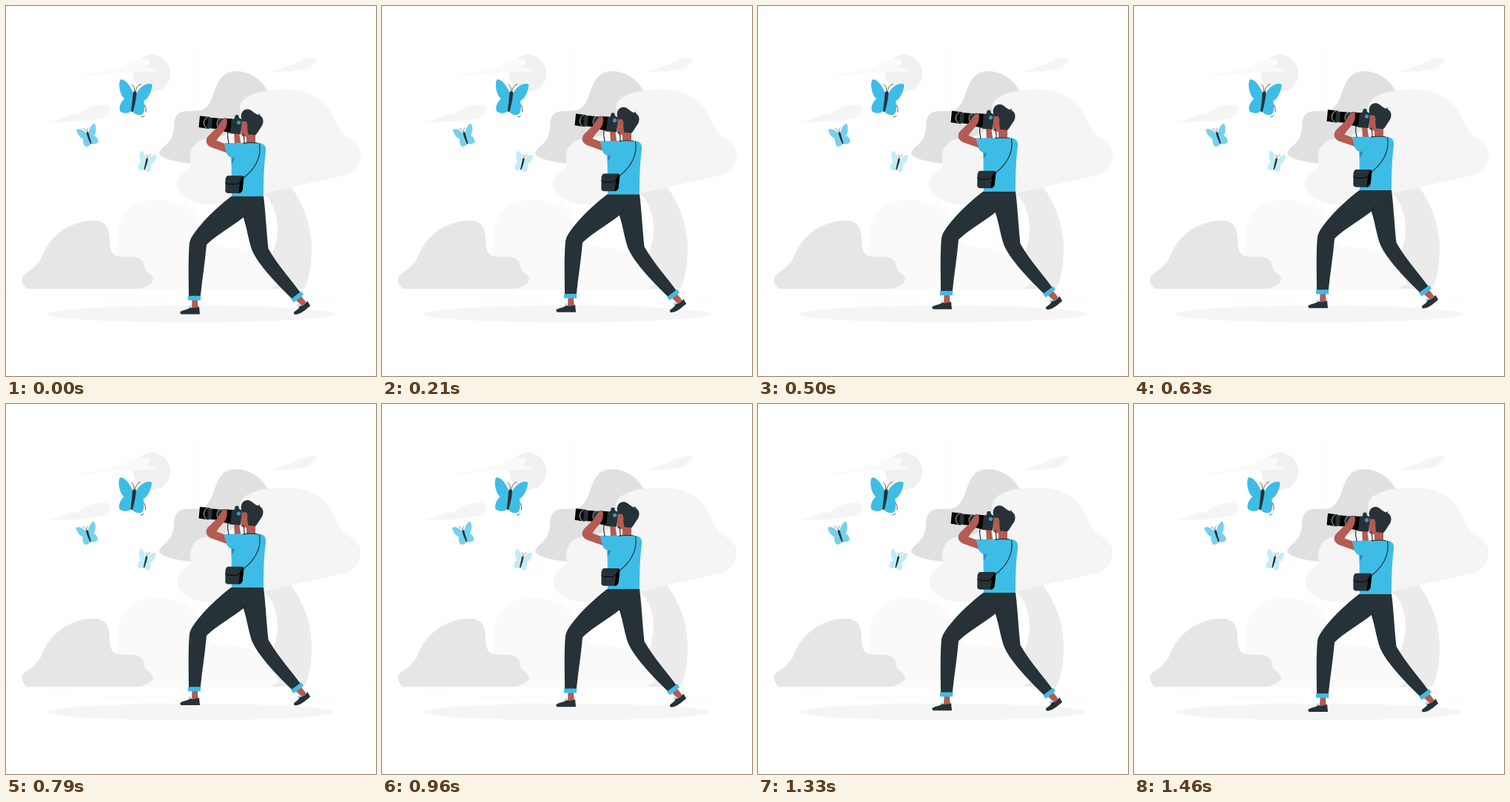
Animation, 500 px wide and 500 px high, one loop 1500 ms. Source, as an HTML page with a canvas:

```html
<!DOCTYPE html>
<html lang="en">
<head>
<meta charset="utf-8">
<title>Butterfly photographer</title>
<style>
html, body { margin: 0; width: 100%; height: 100%; overflow: hidden; background: #fff; }
canvas { display: block; width: 500px; height: 500px; }
</style>
</head>
<body>
<canvas id="stage"></canvas>
<script>
const canvas = document.getElementById('stage');
const ctx = canvas.getContext('2d');
const ratio = window.devicePixelRatio || 1;
canvas.width = canvas.height = 500 * ratio;

const LOOP = 1500, FPS = 24;
const BLUE = '#3dbde5', DARK = '#263238', SKIN = '#b55b52', BLACK = '#000';

const fill = (color, d) => { ctx.fillStyle = color; ctx.fill(new Path2D(d)); };
const line = (color, width, d) => {
  ctx.strokeStyle = color;
  ctx.lineWidth = width;
  ctx.stroke(new Path2D(d));
};
const oval = (color, x, y, rx, ry = rx) => {
  ctx.fillStyle = color;
  ctx.beginPath();
  ctx.ellipse(x, y, rx, ry, 0, 0, Math.PI * 2);
  ctx.fill();
};

// CSS "ease-out": cubic-bezier(0, 0, .58, 1)
function easeOut(p) {
  const bezier = (b, s) => 3 * b * s * s * (1 - s) + s ** 3;
  let low = 0, high = 1;
  for (let i = 0; i < 20; i++) {
    const mid = (low + high) / 2;
    if (bezier(.58, mid) < p) low = mid; else high = mid;
  }
  return bezier(1, low);
}

const SHAKE = [0, -1, 2, -4, 4, -4, 4, -4, 2, -1, 0];
function shake(p) {
  const i = Math.min(9, Math.floor(p * 10));
  return SHAKE[i] + (SHAKE[i + 1] - SHAKE[i]) * easeOut(p * 10 - i);
}
const float = p => -10 * (1 - Math.abs(2 * p - 1));

function drawBackground() {
  ctx.fillStyle = '#ebebeb';
  ctx.fillRect(0, 382.4, 500, .25);
  for (const [x, y, w] of [[416.8, 398.5, 33.1], [322.5, 401.2, 8.7], [396.6, 389.2, 19.2],
                           [52.5, 390.9, 43.2], [104.6, 390.9, 6.3], [131.5, 395.1, 93.7]])
    ctx.fillRect(x, y, w, .25);
  for (const x of [38.3, 254.6]) {
    ctx.strokeStyle = '#ebebeb';
    ctx.lineWidth = .25;
    ctx.beginPath();
    ctx.roundRect(x, 55.1, 204.3, 282.6, 5.6);
    ctx.stroke();
  }

  oval('#f0f0f0', 197, 91, 25);
  fill('#fafafa', 'M95 94C115 91 130 92 146 85C150 81 158 85 164 77C172 72 183 71 192 72C197 75 195 80 187 83C195 85 205 84 205 88C190 90 160 88 135 92C120 94 105 95 95 94Z');
  fill('#f5f5f5', 'M56 157C66 156 75 151 88 147C92 145 98 148 101 143C108 138 120 133 133 133C143 134 143 142 138 146C130 150 132 151 136 151C120 152 108 156 97 156C85 156 68 158 56 157Z');
  fill('#f5f5f5', 'M356 89C366 86 372 84 379 81C383 79 387 81 391 77C396 74 406 70 418 70C423 73 417 79 409 82C411 84 416 83 417 84C405 84 396 87 388 88C376 88 366 89 356 89Z');

  // trees and bushes
  fill('#ebebeb', 'M347 250L385 245C402 266 413 298 413 330C413 355 408 375 402 382H357C340 370 350 350 361 332C372 305 368 268 347 253Z');
  fill('#e0e0e0', 'M207 200C208 191 218 189 223 179C230 167 224 155 232 146C240 139 256 144 266 140C276 135 279 122 283 112C288 97 296 88 310 88C330 88 346 100 354 116L380 200L300 213H250C232 211 214 208 207 200Z');
  fill('#f5f5f5', 'M249.5 213C247 196 253 183 268 180C308 178 320 160 316 137C318 120 345 113 378 113C412 113 432 128 440 145C447 160 453 175 466 180C476 186 481 195 479 206C476 220 466 226 455 229L350 253C340 262 310 267 280 268C250 268 232 255 231 240C232 226 249 222 249.5 213Z');
  fill('#fafafa', 'M151 340C149 320 150 304 155 291C162 270 182 262 205 262C240 262 255 275 262 300C268 318 278 326 300 326C335 325 350 345 370 375L357 382H150Z');
  fill('#e6e6e6', 'M28 382C20 375 20 366 26 362C38 354 43 350 49 338C61 307 88 292 115 290C130 289 140 295 140 315C140 332 144 337 155 339C175 337 186 340 187 352C188 362 199 362 199 370C196 378 185 382 178 382Z');

  oval('#f5f5f5', 249.5, 416.2, 193.9, 11.3);
}

function drawLegs() {
  // ankles and shoes
  fill(SKIN, 'M251.5 396H259L259.5 408H251Z');
  fill(SKIN, 'M392 398L399 392L406 401L400 405Z');
  fill('#a8e0f3', 'M246 407L249 404L251 408Z');
  fill('#a8e0f3', 'M393 405L397 402L400 406L397 409Z');
  fill(DARK, 'M235.5 413C240 410.5 245 410.5 249 407.5C253 408.5 257 408 261 406.5L262 416.5H236.5Q235 415 235.5 413Z');
  fill(DARK, 'M389.3 413.5C393 411 396 408.5 397 405.5C402 405 405 402 407.5 398.8L411.2 405.3C404 411 399 416 392 416.9Q388 417 389.3 413.5Z');
  // trousers
  fill(DARK, 'M305 257C292 266 265.5 290 253 309Q248 316 247.7 323C246 345 247 370 247 393H262.7C265 370 269 346 271 322.5C285 309 305 298 321 285.5C325 298 328 318 332.5 330C339 346 360 370 388 397L398 387.5C387 372 367 350 354.5 328C352 305 350.5 275 348 257Z');
  line('#141b1f', .8, 'M331 275C326 280 322 281 321.5 286L325 297');
  fill(BLUE, 'M246 391.7H263V397.7H246Z');
  fill(BLUE, 'M385 396L399 385.5L402 390L389 400.5Z');
}

function drawHead() {
  fill(SKIN, 'M316 153H327L337 168V187H325V177L318 175Z');
  fill(DARK, 'M318 152C316 143 323 138 329 140C334 142 336 146 341 147L342.5 145L343 148C349 151 348 158 346 162C342 167 340 172 337 174.5L327 173.5L326 163L325 156L319 156Z');
  oval(SKIN, 322.8, 161.5, 3.6, 5);
  line('#8c413b', .6, 'M321 161.5Q323 158.5 324.5 160.5');
}

function drawCamera() {
  fill(SKIN, 'M308 170H315L317.5 188H309Z');
  fill(BLACK, 'M262 148.4L275.5 150L274 166L260.5 164Z');
  fill(DARK, 'M273 150.5L304 153V168L272 165Z');
  fill(BLACK, 'M279 151.3L286 152V166L278 165Z');
  line('#e0e0e0', .9, 'M272 150.5C266 152.5 266 163 271 165');
  line('#e0e0e0', .8, 'M289 152.5C284 154 284 162 287 164.5');
  fill(DARK, 'M303 152.4H308.5L310 147.3H314L315 151.3L318.5 153V158L317 173.3L303 172.3Z');
  fill(BLACK, 'M294 151.5L305 152.5L303 171.5L294 169.5Z');
  oval('#2f9dc0', 314.5, 157.5, 2.6);
}

function drawTorso() {
  fill(BLUE, 'M295 185.2C303 185.2 320 185 340 185C348 185.5 352 188 351 197C348.5 215 348 235 348 257.3H305L304.5 205Q300 203.5 297.5 198Z');
  fill('rgba(0,0,0,.25)', 'M304.5 204.5L309.5 205.5Q308 210 304.7 213.5Z');
  line(DARK, 1.1, 'M321 185.2Q331 184 340 185.2');
  line(BLACK, 1, 'M300 171C299 176 300 180 301 185.5');
  line(BLACK, 1, 'M320.5 173C322 177 322 181 322 185.5');
  line(DARK, 1.2, 'M342.5 186C346 205 335 222 320 233');
  fill(DARK, 'M300.5 229.3H318.5Q321.5 229.3 321.3 232L319.5 249Q318 253 314 253H300Q296 252.5 296.3 249L296.5 234Q297.5 229.5 300.5 229.3Z');
  fill(BLACK, 'M319 230Q321.6 230 321.3 234L319.5 249Q318 253 314 253C315.5 248 315.3 243 316 239Z');
  line(BLACK, .9, 'M296.5 238.5Q297 240.7 300 240.7H312Q315 240.5 317 236');
}

function drawArm() {
  fill(SKIN, 'M297.5 151.3C292 152 290 157 286 163.5L273 176C268.5 182 270.5 188 277.5 191L298 198.2L295 185.8L284.5 182C288 175 296 169.5 298 162.5Q300 154 297.5 151.3Z');
}

function drawPerson(y) {
  ctx.save();
  ctx.translate(0, y);
  drawLegs();
  drawHead();
  drawCamera();
  drawTorso();
  drawArm();
  ctx.restore();
}

function drawButterfly(x, y, sx, sy, degrees, alpha) {
  ctx.save();
  ctx.translate(x, y);
  ctx.rotate(degrees * Math.PI / 180);
  ctx.scale(sx, sy);
  ctx.translate(-173, -128);
  ctx.globalAlpha = alpha;
  fill(BLUE, 'M172 118C169 109 161 98 155 99C151 102 153 120 160 125C154 130 152 138 154 142C160 146 167 145 170 141C172 145 177 147.5 182 147C187 146 188 137 186 128C193 125 197 113 197.5 106C192 102 181 108 176 118Z');
  ctx.globalAlpha = 1;
  fill(DARK, 'M171.3 117Q173.8 113 176.3 116.5C176 125 173.5 135 171.6 142Q170 144 168.9 141.5C170 132 171 125 171.3 117Z');
  line(DARK, .8, 'M173.5 115C174 110 172 107 170 106M175 115C176 109 179 106 182 105.5');
  ctx.restore();
}

function drawButterflies(x) {
  ctx.save();
  ctx.translate(x, 0);
  drawButterfly(173.2, 128.2, 1, 1, 0, 1);
  line(DARK, .8, 'M187.5 134Q190 138 189 143M183 150Q186 150 187 148');
  drawButterfly(111.8, 178, -.6, .6, -10, .7);
  drawButterfly(189.4, 213.2, .52, .57, 7, .3);
  ctx.restore();
}

function draw(now) {
  const frame = Math.floor(now * FPS / 1000 + .1);
  const p = (frame * 1000 / FPS % LOOP) / LOOP;
  ctx.setTransform(ratio, 0, 0, ratio, 0, 0);
  ctx.lineCap = ctx.lineJoin = 'round';
  ctx.fillStyle = '#fff';
  ctx.fillRect(0, 0, 500, 500);
  drawBackground();
  drawPerson(float(p));
  drawButterflies(shake(p));
}

let start;
function tick(now) {
  start ??= now;
  draw(now - start);
  requestAnimationFrame(tick);
}
draw(0);
requestAnimationFrame(tick);
</script>
</body>
</html>
```
